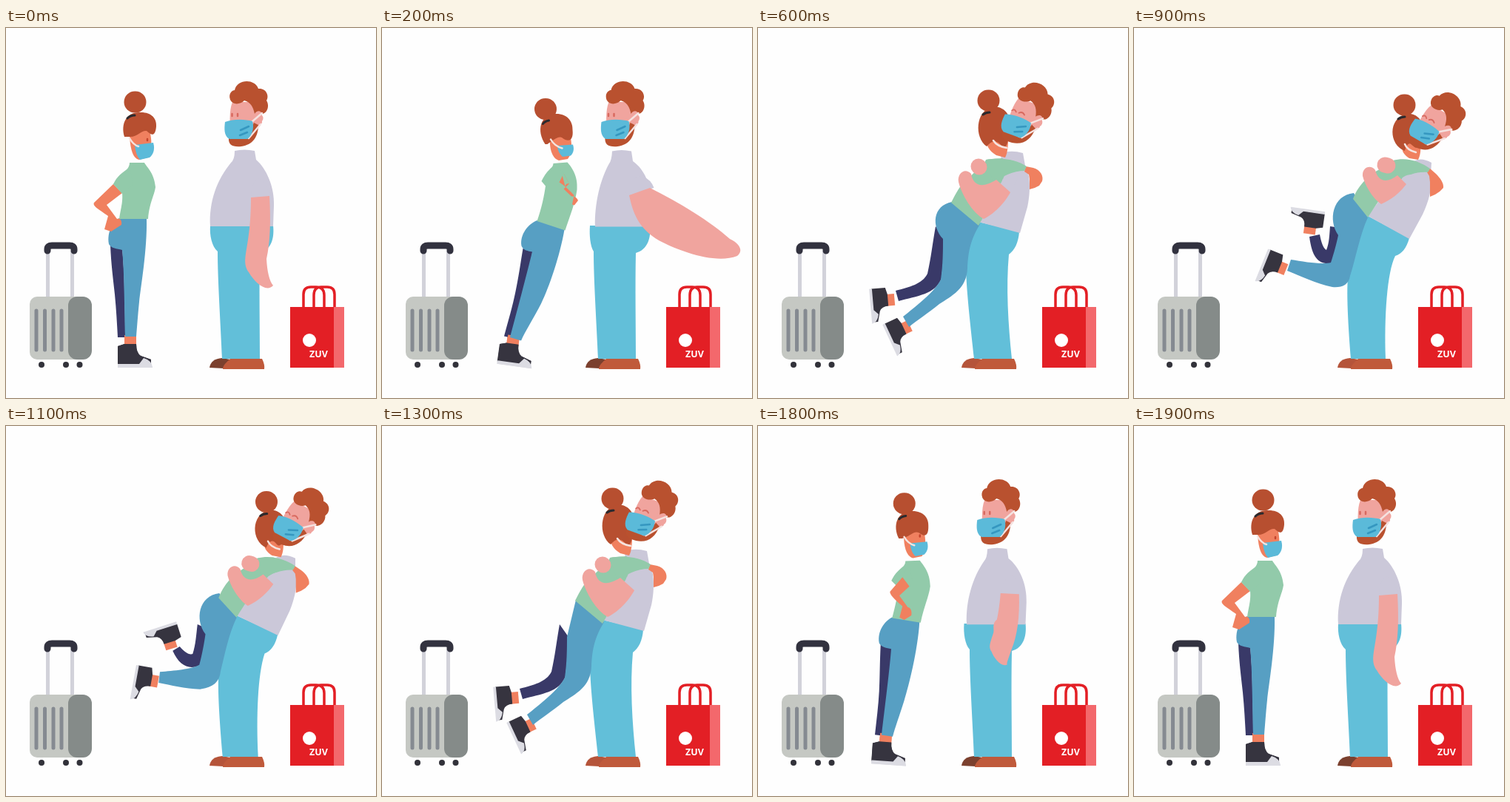
Recreate the animation shown at these times as an HTML page. Size 500x500 px, loop 2 s.

```html
<!DOCTYPE html>
<html lang="en">
<head>
<meta charset="utf-8">
<title>Reunion</title>
<style>
  html, body { margin: 0; width: 100%; height: 100%; overflow: hidden; background: #fefefe; }
  svg { display: block; width: 100%; height: 100%; }
  .line { fill: none; stroke-linecap: round; stroke-linejoin: round; }
</style>
</head>
<body>
<svg viewBox="0 0 500 500">
  <defs>
    <g id="sneaker">
      <path fill="#f0805f" d="M-8 -2H8V13H-8Z"/>
      <path fill="#36343f" d="M-17 13L-8 10H8Q8 22 14 26L28 31V38H-17Z"/>
      <path fill="#dcdce3" d="M-17 37H12L18 29Q29 32 30 42H-17Z"/>
    </g>
  </defs>

  <g id="suitcase">
    <path class="line" stroke="#d2d2da" stroke-width="5" d="M56.5 303V363M89.5 303V363"/>
    <path class="line" stroke="#32323f" stroke-width="9" d="M56 301V299Q56 294 62 294H86Q92 294 92 299V301"/>
    <rect x="32" y="363" width="80" height="85" rx="10" fill="#c5c8c3"/>
    <rect x="84" y="363" width="32" height="85" rx="12" fill="#858b89"/>
    <path class="line" stroke="#858a91" stroke-width="5" d="M41 382V435M52.500 382V435M64 382V435M75 382V435"/>
    <g fill="#32323a"><circle cx="48" cy="455" r="4"/><circle cx="81" cy="455" r="4"/><circle cx="99.500" cy="455" r="4"/></g>
  </g>

  <g id="bag">
    <path class="line" stroke="#e31f25" stroke-width="3.500" d="M402 378V360Q402 350 412 350H419Q430 350 430 361V378M416 378V361Q416 350 426 350H434Q444 350 444 360V378"/>
    <path fill="#e31f25" d="M384 377H443V459H384Z"/>
    <path fill="#f3686c" d="M443 377H457V459H443Z"/>
    <circle cx="410" cy="422" r="9" fill="#fff"/>
    <text x="410" y="445" fill="#fff" font-family="'Open Sans', sans-serif" font-weight="700" font-size="12.500">ZUV</text>
  </g>

  <path id="rearShoe" d="M275 459Q277 447 292 446L303 448L294 460Z"/>
  <path fill="#c05a3b" d="M293 461C293 455 300 450 303 447H346Q350 455 349 461Z"/>
  <path id="trousers" fill="#62bfd9"/>
  <path id="manTorso" fill="#cbc8d9"/>

  <g id="backFoot"><use href="#sneaker"/></g>
  <path id="backLeg" fill="#393968"/>
  <g id="frontFoot"><use href="#sneaker"/></g>
  <path id="frontLeg" fill="#579fc3"/>
  <path id="womanTorso" fill="#92caaa"/>

  <path id="bun" class="line" stroke="#b74f30" stroke-width="29"/>
  <path id="womanFace" fill="#f0805f"/>
  <path id="womanEye" class="line" stroke="#c5452f" stroke-width="2.500"/>
  <path id="womanHair" fill="#b74f30"/>
  <path id="hairTie" class="line" stroke="#2a2a2e" stroke-width="3"/>
  <path id="womanMask" fill="#5bbad9"/>
  <path id="womanStrap" class="line" stroke="#f5e4e0" stroke-width="2.500"/>

  <g id="manHead">
    <path fill="#f0a49e" d="M306 100C301 112 303 130 303 146L332 148L346 128L344 100Z"/>
    <path fill="#b9512f" d="M301 148C300 158 306 161 318 160C334 158 341 146 341 131L335 128L326 150Z"/>
    <path fill="#b9512f" d="M303 97C300 88 306 84 309 84C312 69 336 68 341 82C352 81 356 92 352 98C357 106 352 116 346 116C344 110 338 112 336 116C334 106 330 100 322 98C316 104 306 104 303 97Z"/>
    <circle cx="341" cy="122" r="6.500" fill="#f0a49e"/>
    <path id="eyesOpen" class="line" stroke="#d8695f" stroke-width="2.500" d="M305.500 116V119M313 116V119"/>
    <path id="eyesClosed" class="line" stroke="#d8695f" stroke-width="1.800" d="M303 119Q306 115 309 119M313 119Q317 115 321 119"/>
    <path class="line" stroke="#f5e2e0" stroke-width="2.500" d="M332 127L346 115M328 149L344 130"/>
    <path fill="#5bbad9" d="M296 127C310 122 325 124 333 126C336 136 332 146 326 150H302C294 146 295 135 296 127Z"/>
    <path class="line" stroke="#3597c0" stroke-width="2.500" d="M317 138L328 133M316 145L326 141"/>
  </g>

  <path id="womanForearm" fill="#f0805f"/>
  <path id="womanSleeve" fill="#92caaa"/>
  <path id="manSleeve" fill="#cbc8d9"/>
  <path id="farHand" class="line" stroke="#f0a49e" stroke-width="21"/>
  <path id="manArm" fill="#f0a49e"/>
</svg>

<script>
const LOOP = 2000, STEP = 100;

// Moments of the loop and the pose reached at each.
const timeline = [
  [0, "stand"], [200, "reach"], [400, "lean"], [600, "hug"], [900, "lift"],
  [1000, "lift"], [1300, "hug"], [1600, "release"], [1900, "stand"], [2000, "stand"]
];

// A part without "release" reuses "lean"; one without "reach" moves straight on.
const parts = {
  trousers: {
    stand: "M276 267L361 267C363 285 358 300 343 304C342 350 343 400 343 447L292 447C290 400 286 340 286 302C278 295 275 280 276 267Z",
    lean: "M286 267L363 267C365 285 358 300 343 304C342 350 343 400 343 447L292 447C290 400 286 340 286 302C285 295 285 280 286 267Z",
    hug: "M298 262L353 275C352 290 347 300 339 306C335 350 338 400 343 447L292 447C288 410 282 360 281 325C282 300 290 275 298 262Z",
    lift: "M316 254L372 284C368 298 362 305 353 308C342 330 338 390 340 447L293 447C290 410 286 350 290 330C294 300 302 270 316 254Z"
  },
  manTorso: {
    stand: "M309 166Q322 163 336 166L338 178C352 190 363 215 362 240L361 268L276 268C274 235 285 205 304 182Q309 178 309 166Z",
    lean: "M313 167Q325 164 338 167L340 182C358 192 366 212 365 235L363 269L300 269C300 240 305 205 309 186Q312 180 313 167Z",
    hug: "M328 170Q340 164 358 169L361 186C369 198 368 225 364 242L354 277L298 262C305 245 320 215 325 200Q330 185 328 170Z",
    lift: "M378 180Q388 174 402 182L401 198C404 215 398 235 390 252L372 285L316 254C328 238 345 215 358 205Q374 195 378 180Z"
  },
  backFoot: {
    stand: "translate(168 417) rotate(0) scale(1 1)",
    lean: "translate(187 418) rotate(16) scale(1 0.85)",
    hug: "translate(183 367) rotate(85) scale(1 0.75)",
    lift: "translate(237 277) rotate(188) scale(1 0.75)"
  },
  backLeg: {
    stand: "M141 293L157 297C159 320 160 340 160 360C161 380 161 400 161 418L151 418C150 400 149 380 147 360C145 340 142 320 141 293Z",
    lean: "M240 303L250 303C244 320 234 340 224 358C212 380 200 402 191 420L179 415C190 395 204 372 214 352C224 335 232 318 240 303Z",
    hug: "M240 268L252 285C252 300 250 320 248 338C240 360 215 362 190 369L186 355C205 350 222 346 229 332C234 310 236 290 240 268Z",
    lift: "M265 268L278 270C276 290 272 305 268 318C250 320 241 312 237 282L251 279C253 290 256 298 260 300C264 290 264 280 265 268Z"
  },
  frontFoot: {
    stand: "translate(168 417) rotate(0) scale(1 1)",
    lean: "translate(188 418) rotate(16) scale(1 0.85)",
    hug: "translate(204 403) rotate(65) scale(1 0.75)",
    lift: "translate(204 326) rotate(112) scale(1 0.75)"
  },
  frontLeg: {
    stand: "M153 257L190 257C191 300 182 350 180 370C178 390 177 405 176 417L161 417C160 380 160 330 157 300C150 298 142 298 139 292C136 275 145 262 153 257Z",
    lean: "M266 263L303 288C290 315 270 350 250 375C230 398 210 414 200 428L185 419C205 385 230 340 249 305C245 305 240 303 238 297C236 283 250 268 266 263Z",
    hug: "M262 235L300 265C288 285 284 300 283 325C282 352 262 362 245 373C230 385 215 395 204 404L196 390C215 375 240 355 247 340C250 320 250 300 250 285C234 268 236 240 262 235Z",
    lift: "M297 223L316 256C305 280 300 310 292 335C290 348 280 351 268 350C245 345 225 335 207 328L212 313C230 316 255 320 266 317C270 305 274 290 276 280C262 260 268 226 297 223Z"
  },
  womanTorso: {
    stand: "M167 182L187 182C190 188 200 195 202 215C200 228 194 235 192 258L153 258C156 240 158 235 157 222L145 211C150 200 158 195 162 192C165 190 167 186 167 182Z",
    lean: "M296 184L314 181C324 190 330 205 325 222C322 245 315 270 303 289L266 264C276 245 280 220 285 205L286 203C290 195 292 190 294 187C295 186 296 185 296 184Z",
    hug: "M308 178L330 176C340 182 335 200 325 215C315 235 308 250 298 267L261 236C268 222 274 212 280 206L285 203C290 196 300 190 304 186C306 183 307 180 308 178Z",
    lift: "M350 179L372 178C380 185 370 200 352 210C338 222 326 240 316 256L296 231C300 220 306 212 312 206L318 200C325 194 338 188 344 184C347 182 349 181 350 179Z"
  },
  bun: { stand: "M174 100h1", lean: "M267 119h1", hug: "M311 98h1", lift: "M365 104h1" },
  womanFace: {
    stand: "M167 146C168 160 170 176 180 178L192 175C198 165 197 150 194 138L176 140Z",
    lean: "M287 150C284 162 288 176 298 180L310 179C318 172 316 160 314 150L296 146Z",
    hug: "M311 150C306 156 312 166 322 172L334 175C338 168 338 155 338 146L320 140Z",
    lift: "M364 160C360 166 366 172 372 176L384 178C388 170 388 160 386 152L370 148Z"
  },
  womanEye: { stand: "M191 150v2", lean: "M302 140v2", hug: "M330 138v2", lift: "M380 138v2" },
  womanHair: {
    stand: "M160 147C155 130 162 114 180 114C196 113 204 122 203 133C202 145 198 147 190 139C182 138 178 148 166 147Z",
    lean: "M281 167C262 148 265 120 289 118C304 118 312 130 312 142C316 158 308 162 300 160C296 150 286 155 281 167Z",
    hug: "M309 160C292 148 294 112 316 107C330 104 342 116 340 130C340 150 336 166 330 160C322 150 316 152 309 160Z",
    lift: "M366 166C344 158 343 122 368 116C380 114 392 124 390 138C388 156 384 166 378 160C372 152 368 158 366 166Z"
  },
  hairTie: {
    stand: "M164 122Q168 118 174 118", lean: "M271 137Q272 134 277 132",
    hug: "M304 117Q308 114 313 114", lift: "M357 123Q361 120 366 120"
  },
  womanMask: {
    stand: "M174 158L199 155C202 165 198 172 194 175L181 178C176 172 175 166 174 158Z",
    lean: "M300 160L317 160C319 165 317 168 316 170L307 170C302 166 300 164 300 160Z",
    hug: "M338 138L352 138C354 142 353 146 350 148L342 148C339 145 338 142 338 138Z",
    lift: "M384 146L398 146C400 150 399 154 396 156L388 156C385 153 384 150 384 146Z"
  },
  womanStrap: {
    stand: "M167 149Q172 158 179 160", lean: "M289 152Q294 161 308 165",
    hug: "M318 152Q323 160 336 162", lift: "M366 157Q369 165 381 168"
  },
  manHead: {
    stand: "translate(0 0) rotate(0 314 138)", lean: "translate(1 0) rotate(0 314 138)",
    hug: "translate(33 -5) rotate(20 314 138)", lift: "translate(76 3) rotate(30 314 138)"
  },
  womanForearm: {
    stand: "M145 211L119 236C117 240 122 243 138 254L133 272L142 275L156 266C157 260 154 256 150 258L136 239L157 223Z",
    lean: "M346 182L360 181C370 182 378 188 381 198L381 205L378 204L374 200C370 198 366 198 362 197L355 196L349 198Z",
    hug: "M362 187L372 189C382 192 386 200 384 207L380 213L374 216L367 218C367 212 367 208 367 204L366 198L360 194Z",
    lift: "M400 190L408 197C414 203 419 210 418 216L413 221L407 225L400 228C400 220 400 214 400 208L399 200L396 195Z",
    release: "M346 184L356 188C364 194 367 204 367 212L366 219L364 223L361 226C362 220 363 214 360 206L356 200L348 197Z"
  },
  womanSleeve: {
    stand: "M168 192C160 196 151 204 145 211L157 224C162 220 166 215 172 212Z",
    lean: "M314 186C325 184 336 182 346 182L349 197C338 200 331 206 323 216Z",
    hug: "M308 178C328 174 350 178 363 187L360 193C345 193 330 200 318 210Z",
    lift: "M350 179C368 174 386 180 400 190L397 195C382 194 370 198 356 208Z"
  },
  manSleeve: {
    stand: "M331 228C331 210 340 200 345 205Q352 210 356 226L345 227L335 229Z",
    lean: "M325 217C335 200 350 196 362 197Q375 200 379 206L345 218L338 224Z",
    hug: "M330 205C340 200 346 195 350 200Q352 205 345 215L341 220L335 215Z",
    lift: "M362 203C366 200 372 196 378 200Q380 205 376 210L370 214L364 208Z",
    release: "M320 217C328 200 345 196 352 200Q358 210 350 222L343 228L330 224Z"
  },
  farHand: {
    stand: "M343 290L343 300", reach: "M440 282L450 288", lean: "M423 253L429 248",
    hug: "M298 187L299 188", lift: "M339 185L343 186", release: "M286 211L287 210"
  },
  manArm: {
    stand: "M331 229L356 227C358 262 357 290 352 312C353 330 356 342 361 348C352 358 336 344 328 330C316 312 331 300 331 229Z",
    reach: "M334 226L362 216C400 235 445 262 470 285C485 292 488 302 480 308C450 320 400 300 380 290C350 275 340 255 334 226Z",
    lean: "M337 221L379 206C405 225 440 245 446 272C430 300 395 312 365 311C345 309 335 307 333 303C334 285 345 260 337 221Z",
    hug: "M322 205L341 222C336 232 322 250 305 258C290 250 275 225 271 208C269 196 280 188 288 197C291 215 305 216 322 205Z",
    lift: "M356 199L368 211C360 222 348 232 334 238C322 230 312 212 309 200C308 188 320 184 326 192C330 208 342 210 356 199Z",
    release: "M318 217L343 228C341 250 330 265 314 273C295 266 275 255 264 246C260 232 268 225 277 227C285 234 300 240 318 217Z"
  }
};

const NUMBER = /-?\d+(?:\.\d+)?/g;
const byId = id => document.getElementById(id);
const ease = p => (1 - Math.cos(Math.PI * p)) / 2;

// Blends two strings that differ only in their numbers.
function blend(from, to, p) {
  const ends = to.match(NUMBER);
  let i = 0;
  return from.replace(NUMBER, n => (+n + (ends[i++] - n) * p).toFixed(2));
}

const tracks = Object.entries(parts).map(([id, poses]) => {
  const node = byId(id);
  const keys = timeline
    .map(([time, pose]) => [time, poses[pose] ?? (pose === "release" ? poses.lean : null)])
    .filter(key => key[1]);
  return { node, keys, attribute: node.tagName === "g" ? "transform" : "d" };
});

function draw(time) {
  for (const { node, keys, attribute } of tracks) {
    const next = keys.findIndex(key => key[0] > time);
    const [start, from] = keys[next - 1], [end, to] = keys[next];
    node.setAttribute(attribute, blend(from, to, ease((time - start) / (end - start))));
  }
  const hugging = time >= 500 && time < 1500;
  byId("eyesOpen").style.display = hugging ? "none" : "";
  byId("eyesClosed").style.display = hugging ? "" : "none";
  byId("rearShoe").setAttribute("fill", hugging ? "#b5543a" : "#7b402e");
}

const began = performance.now();
function tick() {
  const time = (performance.now() - began) % LOOP;
  draw(Math.floor(time / STEP) * STEP);
  requestAnimationFrame(tick);
}
tick();
</script>
</body>
</html>
```
